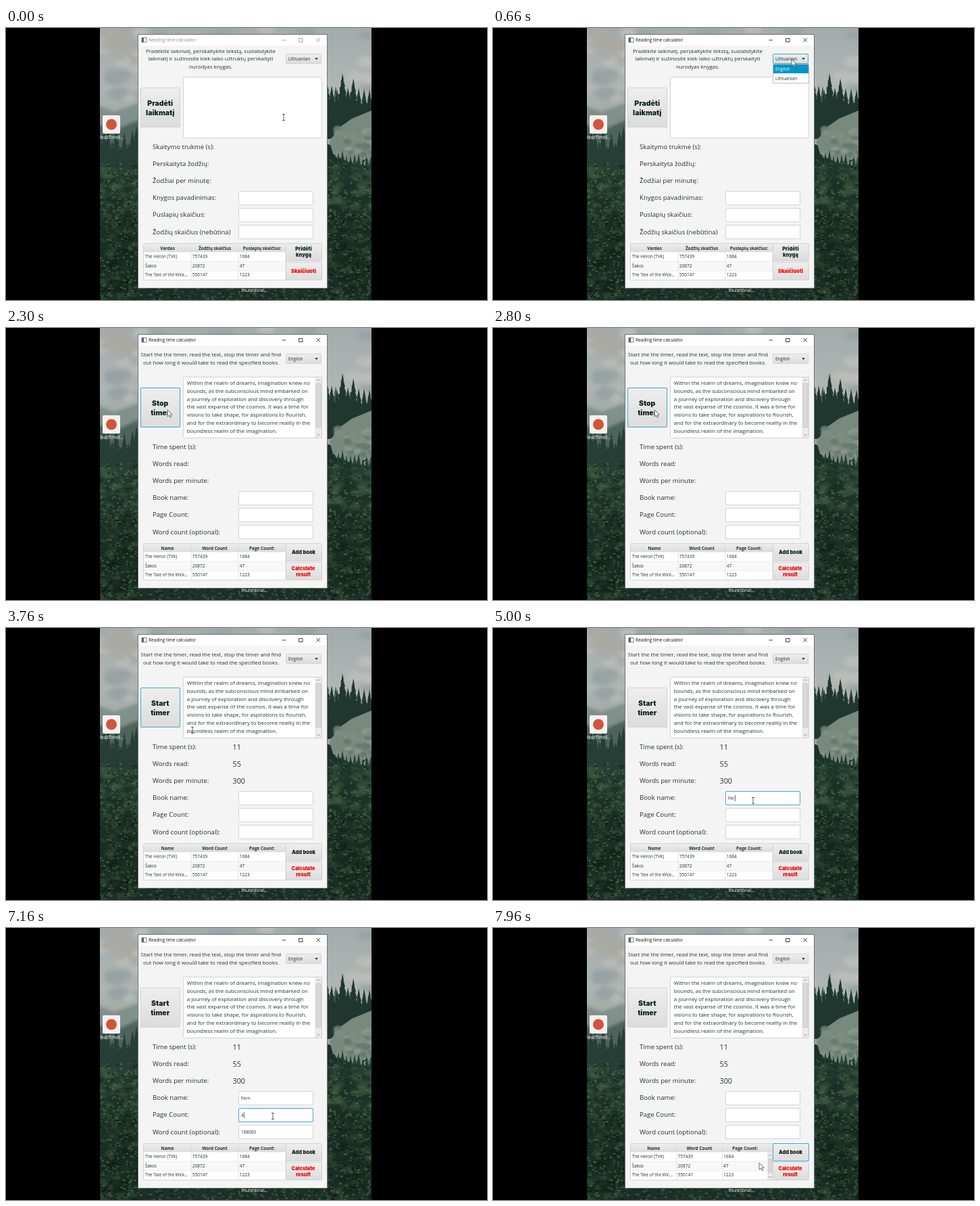
Recreate the animation shown at these times as an HTML page with a canvas. Size 712 by 402 pixels, loop 8000 ms.

```html
<!DOCTYPE html>
<html lang="en">
<head>
<meta charset="utf-8">
<title>Reading time calculator</title>
<style>
  html, body { margin: 0; width: 100%; height: 100%; overflow: hidden; background: #000; }
  canvas, svg { position: absolute; left: 0; top: 0; width: 712px; height: 402px; }
  text { font-family: "Open Sans", "Noto Sans", sans-serif; fill: #26312d; white-space: pre; }
  .heavy { font-family: Inter, "Arial Black", sans-serif; font-weight: 900; fill: #14291f; }
  .head { font-weight: 700; font-size: 6.4px; }
  .mid { text-anchor: middle; }
  .white { fill: #fff; }
  .red { fill: #f00b0b; }
</style>
</head>
<body>
<canvas id="wallpaper" width="712" height="402"></canvas>
<svg id="stage" viewBox="0 0 712 402">
  <defs>
    <linearGradient id="button" x2="0" y2="1">
      <stop offset="0" stop-color="#eeeeee"/><stop offset="1" stop-color="#dcdcdc"/>
    </linearGradient>
    <clipPath id="desktop"><path d="M139 0H541V402H139Z"/></clipPath>
  </defs>
</svg>
<script>
const LOOP = 8000;
const T = { activate: 430, open: 520, english: 950, start: 1650, stop: 3150,
            name: 4350, words: 5700, pages: 6950, add: 7600 };
const stage = document.getElementById('stage');
const timed = [];

// ---- Wallpaper -------------------------------------------------------
function paintWallpaper() {
  const c = document.getElementById('wallpaper').getContext('2d');
  let seed = 17;
  const rnd = (a = 0, b = 1) => {
    seed = (seed * 16807) % 2147483647;
    return a + (b - a) * seed / 2147483647;
  };
  const ellipse = (x, y, rx, ry, color) => {
    c.fillStyle = color;
    c.beginPath();
    c.ellipse(x, y, rx, ry, 0, 0, 7);
    c.fill();
  };
  const shape = (color, ...pts) => {
    c.fillStyle = color;
    c.beginPath();
    for (let i = 0; i < pts.length; i += 2) c.lineTo(pts[i], pts[i + 1]);
    c.fill();
  };
  const pine = (x, top, h, color) => {
    c.fillStyle = color;
    c.beginPath();
    c.moveTo(x, top);
    for (let s = 1; s > -2; s -= 2)
      for (let k = 1; k <= 7; k++) {
        const j = s > 0 ? k : 8 - k, w = j * h / 34;
        c.lineTo(x + s * w, top + h * j / 7);
        c.lineTo(x + s * w * .6, top + h * (j - .1) / 7);
      }
    c.fill();
  };
  const dabs = (n, x0, x1, y0, y1, size, colors) => {
    for (let i = 0; i < n; i++)
      ellipse(rnd(x0, x1), rnd(y0, y1), rnd(.5, 1) * size, rnd(.3, .6) * size, colors[i % colors.length]);
  };
  const blurred = (radius, draw) => {
    c.filter = `blur(${radius}px)`;
    draw();
    c.filter = 'none';
  };

  c.beginPath();
  c.rect(139, 0, 402, 402);
  c.clip();
  const sky = c.createLinearGradient(0, 0, 0, 150);
  sky.addColorStop(0, '#a3abad');
  sky.addColorStop(.6, '#b0b6b3');
  sky.addColorStop(1, '#96a29e');
  c.fillStyle = sky;
  c.fillRect(139, 0, 402, 402);
  blurred(3, () => dabs(70, 139, 541, 0, 105, 17, ['#b9bcb8', '#98a3a6', '#aaaaa2']));

  blurred(2, () => {
    shape('#80908b', 130, 112, 160, 124, 205, 108, 205, 230, 130, 230);
    shape('#4d645c', 130, 142, 165, 150, 205, 132, 205, 230, 130, 230);
  });
  shape('#1b3028', 139, 186, 200, 174, 300, 190, 470, 170, 541, 190, 541, 402, 139, 402);
  for (let x = 139; x < 202; x += 6) pine(x, rnd(144, 176), 52, x % 4 ? '#263e35' : '#1c3029');

  for (let x = 474; x < 546; x += 7) pine(x, rnd(76, 102), 56, '#42594f');
  for (let x = 474; x < 546; x += 8) pine(x, rnd(62, 92), 72, '#20372f');
  shape('#20372f', 470, 118, 541, 112, 541, 132, 505, 142, 480, 164, 470, 164);
  shape('#78897e', 541, 122, 512, 134, 492, 148, 479, 168, 484, 186, 508, 199, 541, 205);
  blurred(1, () => dabs(30, 490, 541, 148, 194, 9, ['#8a988b', '#667a70', '#7d8d82']));
  for (let x = 474; x < 546; x += 6) pine(x, rnd(180, 196), 34, '#243d34');

  for (const [x0, x1] of [[139, 198], [474, 541]]) {
    blurred(2, () => {
      dabs(45, x0, x1, 205, 275, 10, ['#2f4a38', '#3a563f', '#1e352b']);
      dabs(70, x0, x1, 270, 402, 10, ['#15251c', '#2a422f', '#1c3026']);
    });
    dabs(180, x0, x1, 195, 280, 2.6, ['#2f4a38', '#45613f', '#1a2f25']);
    dabs(380, x0, x1, 275, 402, 2.6, ['#101d16', '#2c4630', '#405a3c', '#182a20']);
  }
  dabs(220, 190, 480, 382, 402, 3, ['#15261d', '#2a4430', '#36503a']);
}

// ---- Element helpers -------------------------------------------------
function add(tag, attrs, span) {
  const node = document.createElementNS('http://www.w3.org/2000/svg', tag);
  for (const key in attrs) node.setAttribute(key, attrs[key]);
  stage.append(node);
  if (span) timed.push({ node, from: span[0], to: span[1] });
  return node;
}
const rect = (x, y, width, height, fill, more, span) =>
  add('rect', { x, y, width, height, fill, ...more }, span);
const path = (d, stroke, span, more) =>
  add('path', { d, stroke, fill: 'none', ...more }, span);
function text(x, y, string, size, cls = '', span) {
  const node = add('text', { x, y, class: cls, style: size ? `font-size:${size}px` : '' }, span);
  node.textContent = string;
  return node;
}
const lines = (x, y, gap, strings, size, cls, span) =>
  strings.forEach((s, i) => text(x, y + i * gap, s, size, cls, span));
const box = (x, y, w, h, fill, stroke = '#d4d4d4', span) =>
  rect(x + .5, y + .5, w - 1, h - 1, fill, { stroke, rx: 1.5 }, span);
const ring = (x, y, w, h, span) =>
  rect(x + .5, y + .5, w - 1, h - 1, 'none', { stroke: '#45aacd', rx: 1.5 }, span);

const LT = [0, T.english], EN = [T.english, LOOP];

// ---- Desktop and window frame ----------------------------------------
function buildFrame() {
  rect(143, 129, 26, 27, '#f2f2f0', { rx: 2 });
  add('circle', { cx: 156, cy: 142.5, r: 8, fill: '#d2553b' });
  text(156, 164.3, 'ReadTimeE...', 6.3, 'mid white').setAttribute('clip-path', 'url(#desktop)');
  text(368, 389.6, 'thunmbnai...', 6.5, 'mid white');

  rect(195.5, 9.5, 280, 375, '#f4f4f4', { stroke: '#6d7a77' });
  rect(196, 10, 279, 16, '#fff');
  rect(201, 14.5, 7, 6.5, '#fff', { stroke: '#59636a', 'stroke-width': .8 });
  rect(201, 14.5, 3, 6.5, '#59636a');
  for (const [color, span] of [['#8d8d8d', [0, T.activate]], ['#111', [T.activate, LOOP]]]) {
    text(211, 20.3, 'Reading time calculator', 6.45, '', span).style.fill = color;
    path('M408.5 18H414M433.5 15.5H439V20.5H433.5ZM459.5 15L465 20.5M465 15L459.5 20.5',
      color, span, { 'stroke-width': .8 });
  }
}

// ---- Form ------------------------------------------------------------
function buildForm() {
  lines(303, 36.8, 11.6, ['Pradėkite laikmatį, perskaitykite tekstą, sustabdykite',
    'laikmatį ir sužinosite kiek laiko užtruktų perskaityti', 'nurodyas knygas.'], 7.92, 'mid', LT);
  lines(303.5, 42.2, 11.7, ['Start the the timer, read the text, stop the timer and find',
    'out how long it would take to read the specified books.'], 7.92, 'mid', EN);

  box(414, 38, 53, 15, 'url(#button)');
  ring(414, 38, 53, 15, [T.activate, T.start]);
  text(418, 47.9, 'Lithuanian', 6.5, '', LT);
  text(418, 47.9, 'English', 6.5, '', EN);
  add('path', { d: 'M457 44.3h5l-2.5 2.8z', fill: '#333' });

  const shown = [T.start, LOOP];
  box(262, 72, 206, 91, '#fff');
  lines(267.7, 84, 11.75, ['Within the realm of dreams, imagination knew no',
    'bounds, as the subconscious mind embarked on', 'a journey of exploration and discovery through',
    'the vast expanse of the cosmos. It was a time for', 'visions to take shape, for aspirations to flourish,',
    'and for the extraordinary to become reality in the', 'boundless realm of the imagination.'], 7.95, '', shown);
  scrollbar(458, 73, 9, 89, 65, shown);

  box(199, 88, 59, 59, 'url(#button)');
  ring(199, 88, 59, 59, [T.start, T.name]);
  const label = (a, b, span) => lines(228.2, 115.2, 13.5, [a, b], 10.5, 'heavy mid', span);
  label('Pradėti', 'laikmatį', LT);
  label('Start', 'timer', [T.english, T.start]);
  label('Stop', 'timer', [T.start, T.stop]);
  label('Start', 'timer', [T.stop, LOOP]);

  lines(217, 179, 25.1, ['Skaitymo trukmė (s):', 'Perskaityta žodžių:', 'Žodžiai per minutę:',
    'Knygos pavadinimas:', 'Puslapių skaičius:', 'Žodžių skaičius (nebūtina)'], 9.6, '', LT);
  lines(217, 179, 25.1, ['Time spent (s):', 'Words read:', 'Words per minute:',
    'Book name:', 'Page Count:', 'Word count (optional):'], 9.6, '', EN);
  lines(335.5, 179.5, 25.1, ['11', '55', '300'], 10.8, '', [T.stop, LOOP]);
}

function scrollbar(x, y, w, h, thumb, span) {
  const m = x + w / 2;
  rect(x, y, w, h, '#ececec', { stroke: '#d8d8d8', 'stroke-width': .6 }, span);
  rect(x + 1, y + 9, w - 2, thumb, '#dadada', { stroke: '#bcbcbc', 'stroke-width': .7, rx: 1 }, span);
  path(`M${m - 2} ${y + 5}l2 -2l2 2M${m - 2} ${y + h - 5}l2 2l2 -2`, '#777', span, { 'stroke-width': .8 });
}

// ---- Table and its buttons -------------------------------------------
function buildTable() {
  box(203, 318, 212, 55, '#fff');
  rect(204, 345, 210, 14, '#f8f8f8');
  rect(204, 319, 210, 12, 'url(#button)');
  const rows = [['The Heron (TVK)', '757439', '1684'], ['Šakos', '20872', '47'],
                ['The Tale of the Wick...', '550147', '1223']];
  const narrow = rows.map(r => [r[0].replace('Wick', 'Wic'), r[1], r[2]]);
  const grid = (width, data, headSets, span) => {
    for (let i = 0; i < 3; i++) {
      const left = 204 + i * width;
      path(`M${left + width} 319V372`, '#d9d9d9', span, { 'stroke-width': .7 });
      for (const [heads, when] of headSets)
        text(left + width / 2, 327.5, heads[i], 0, 'head mid', when);
      data.forEach((row, r) =>
        text(left + 1.7, 340.4 + r * 13.3, row[i], i ? 6.6 : 6.35, '', span));
    }
  };
  const en = ['Name', 'Word Count', 'Page Count:'];
  grid(70, rows, [[['Vardas', 'Žodžių skaičius', 'Puslapių skaičius:'], LT],
                  [en, [T.english, T.add]]], [0, T.add]);
  grid(67.7, narrow, [[en, [T.add, LOOP]]], [T.add, LOOP]);
  path('M204 331H414M204 345H414M204 359H414', '#e2e2e2', null, { 'stroke-width': .6 });
  scrollbar(407, 332, 6.5, 40, 21, [T.add, LOOP]);

  box(414, 318, 54, 27, 'url(#button)');
  box(414, 346, 54, 27, 'url(#button)');
  ring(414, 318, 54, 27, [T.add, LOOP]);
  lines(440.5, 329.3, 9, ['Pridėti', 'knygą'], 7.35, 'heavy mid', LT);
  text(440.5, 334, 'Add book', 7.35, 'heavy mid', EN);
  text(440.5, 362, 'Skaičiuoti', 7.35, 'heavy mid red', LT);
  lines(440, 357.5, 9, ['Calculate', 'result'], 7.35, 'heavy mid red', EN);
}

// ---- Typed fields ----------------------------------------------------
const fields = [
  { y: 241, value: 'Fern', focus: [T.name, T.words], start: 4800, key: 90 },
  { y: 266, value: '412', focus: [T.pages, T.add], start: 7080, key: 90 },
  { y: 291, value: '188000', focus: [T.words, T.pages], start: 6230, key: 90 }
];
function buildFields() {
  for (const f of fields) {
    box(344, f.y, 111, 21, '#fff');
    ring(344, f.y, 111, 21, f.focus);
    f.node = text(348, f.y + 13, '', 6.5);
    f.caret = rect(348, f.y + 6, .7, 9, '#333', {}, f.focus);
  }
}
function updateFields(t) {
  for (const f of fields) {
    const typed = t < T.add ? Math.max(0, Math.floor((t - f.start) / f.key) + 1) : 0;
    const value = f.value.slice(0, typed);
    if (f.node.textContent !== value) f.node.textContent = value;
    f.caret.setAttribute('x', 348.3 + (value ? f.node.getComputedTextLength() : 0));
  }
}

function buildPopup() {
  const span = [T.open, T.english];
  box(414, 53, 54, 29, '#fff', '#bdbdbd', span);
  rect(415, 54, 52, 13, '#0096c9', {}, span);
  text(418, 62.8, 'English', 6.5, 'white', span);
  text(418, 76.6, 'Lithuanian', 6.5, '', span);
}

// ---- Pointer ---------------------------------------------------------
const route = [
  [0, 411, 132], [220, 411, 132], [430, 442, 46], [680, 442, 46], [850, 434, 60], [1000, 434, 60],
  [1400, 246, 97], [1570, 239, 121], [3250, 239, 121], [3760, 276, 151], [4250, 385, 255],
  [5200, 385, 255], [5600, 401, 303], [6720, 401, 303], [6900, 395, 278], [7300, 395, 278],
  [7540, 438, 333], [7680, 438, 333], [7960, 394, 347], [8000, 394, 347]
];
let arrow, beam;
function buildPointer() {
  arrow = path('M0 0V10L2.4 7.9L4 11.3L5.7 10.5L4.2 7.2H7.2Z', '#333', null,
    { fill: '#fff', 'stroke-width': .7 });
  beam = path('M-2 -4.5H2M0 -4.5V4.5M-2 4.5H2', '#333', null, { 'stroke-width': .8 });
}
function updatePointer(t) {
  const i = route.findIndex((p, k) => k && t <= p[0]);
  const [t0, x0, y0] = route[i - 1], [t1, x1, y1] = route[i];
  const u = (t - t0) / (t1 - t0), e = u * u * (3 - 2 * u);
  const x = x0 + (x1 - x0) * e, y = y0 + (y1 - y0) * e;
  const overText = (x > 262 && x < 458 && y > 72 && y < 163) ||
    fields.some(f => x > 344 && x < 455 && y > f.y && y < f.y + 21);
  arrow.style.display = overText ? 'none' : '';
  beam.style.display = overText ? '' : 'none';
  (overText ? beam : arrow).setAttribute('transform', `translate(${x} ${y})`);
}

paintWallpaper();
buildFrame();
buildForm();
buildTable();
buildFields();
buildPopup();
buildPointer();

const origin = performance.now();
function frame() {
  const t = (performance.now() - origin) % LOOP;
  for (const { node, from, to } of timed)
    node.style.display = t >= from && t < to ? '' : 'none';
  updateFields(t);
  updatePointer(t);
  requestAnimationFrame(frame);
}
frame();
</script>
</body>
</html>
```
